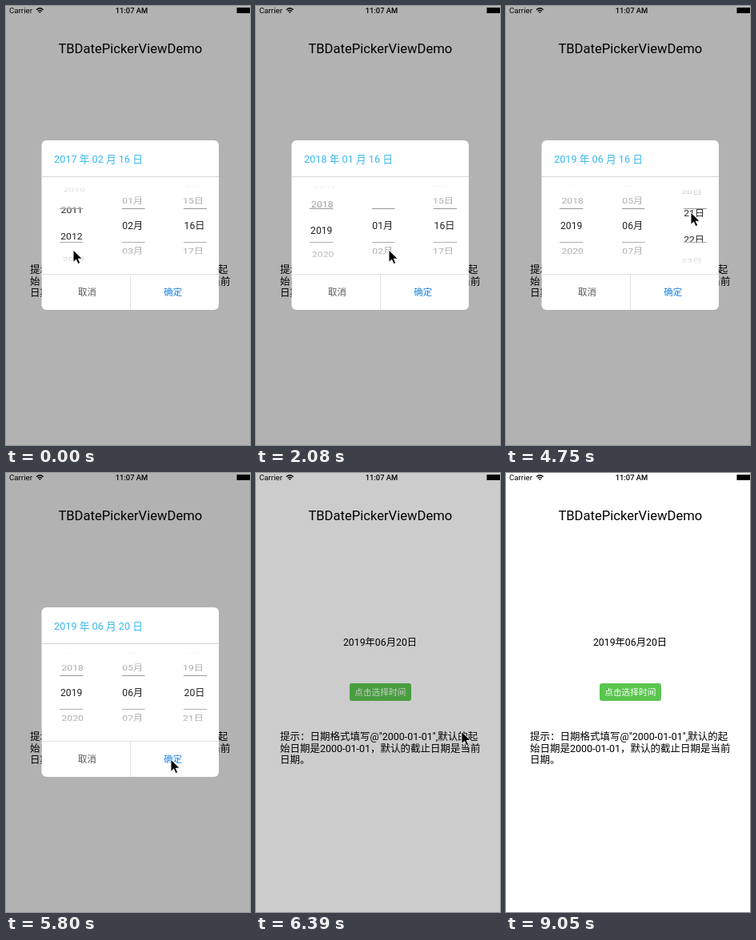
Recreate the animation shown at these times as an HTML page. Size 305 px wide and 549 px high, loop 9.65 s.

```html
<!DOCTYPE html>
<html lang="zh-CN">
<head>
<meta charset="utf-8">
<title>Date picker</title>
<style>
html, body { margin: 0; width: 100%; height: 100%; overflow: hidden; background: #fff; }
svg { display: block; width: 305px; height: 549px; }
text { font-family: Roboto, "Noto Sans CJK SC", "Noto Sans CJK JP", "Noto Sans CJK", sans-serif; font-size: 12.3px; }
.mid { text-anchor: middle; }
.row { text-anchor: middle; fill: #222; font-size: 12.2px; }
.hint { font-size: 12.5px; }
.action { text-anchor: middle; font-size: 11.4px; }
</style>
</head>
<body>
<svg viewBox="0 0 305 549">
  <defs>
    <linearGradient id="fade" x1="0" y1="0" x2="0" y2="1">
      <stop offset="0" stop-color="#fff" stop-opacity=".5"/>
      <stop offset=".45" stop-color="#fff" stop-opacity=".72"/>
      <stop offset=".77" stop-color="#fff"/>
    </linearGradient>
  </defs>
  <rect width="305" height="549" fill="#fff"/>

  <text x="4" y="9.3" style="font-size:9.7px">Carrier</text>
  <path d="M38 4.7Q42.3 .9 46.6 4.7M39.7 6.5Q42.3 4.2 44.9 6.5" fill="none" stroke="#000" stroke-width="1.3"/>
  <path d="M42.3 9L40.9 7.6Q42.3 6.6 43.7 7.6Z"/>
  <text x="157" y="9.3" class="mid" style="font-size:9.4px;font-weight:500">11:07 AM</text>
  <rect x="288.5" y="2" width="17" height="7"/>

  <text x="155.3" y="59" class="mid" style="font-size:16.6px">TBDatePickerViewDemo</text>
  <text x="155" y="215.5" class="mid">2019年06月20日</text>
  <rect x="117" y="263" width="77" height="22" rx="3" fill="#5ac54f"/>
  <text x="155.3" y="278.2" class="mid" fill="#fff" style="font-size:10.7px">点击选择时间</text>
  <text x="30" y="334" class="hint">提示：日期格式填写@"2000-01-01",默认的起</text>
  <text x="30" y="348.5" class="hint">始日期是2000-01-01，默认的截止日期是当前</text>
  <text x="30" y="363" class="hint">日期。</text>

  <rect id="dim" width="305" height="549"/>

  <g id="popup">
    <rect x="44.5" y="168" width="221.5" height="212" rx="6" fill="#fff"/>
    <text id="heading" x="60" y="195.5" fill="#35b8ee" style="font-size:12.7px"></text>
    <g id="wheels"></g>
    <rect id="shade" x="46" y="295.5" width="218" height="39" fill="url(#fade)"/>
    <use href="#shade" transform="matrix(1 0 0 -1 0 549)"/>
    <path d="M67 253.5h29.5M145 253.5h28.5M222 253.5h29" stroke="#999"/>
    <path d="M67 295.5h29.5M145 295.5h28.5M222 295.5h29" stroke="#b0b0b0"/>
    <path d="M44.5 213.5h221.5" stroke="#d4d4d4"/>
    <path d="M44.5 335.5h221.5M155.5 335.5v44.5" stroke="#e2e2e2"/>
    <text x="101.5" y="362.3" class="action" fill="#555">取消</text>
    <text x="208.7" y="362.3" class="action" fill="#1b83e6">确定</text>
  </g>

  <path id="cursor" d="M0 0V15.5L3.6 12.2 6 17.6 8.8 16.4 6.4 11.2H11.3Z" stroke="#fff" stroke-linejoin="round"/>
</svg>
<script>
const LOOP = 9650, STEP = 148.4, LAST = 61;
const CENTER = 275, RADIUS = 53, ROW_ANGLE = 0.637, AXIS = 158;
const $ = id => document.getElementById(id);
const pad = n => String(n).padStart(2, '0');
const progress = (s, start, end) => Math.min(1, Math.max(0, (s - start) / (end - start)));
const smooth = p => p * p * (3 - 2 * p);
const lerp = (a, b, p) => a + (b - a) * p;

// Spins turn a wheel to a new value between two steps.
const wheels = [
  { x: 81.7, unit: '', min: 2000, max: 2099, from: 2011.42, picked: 2017, spins: [
    { start: -1, end: 9, to: 2018 }, { start: 9.5, end: 15.5, to: 2019 }] },
  { x: 158.3, unit: '月', min: 1, max: 12, from: 2, picked: 2, spins: [
    { start: 8, end: 10, to: 1 }, { start: 15, end: 23, to: 6 }] },
  { x: 235.5, unit: '日', min: 1, max: 30, from: 16, picked: 16, spins: [
    { start: 26, end: 30, to: 22 }, { start: 30, end: 36, to: 20 }] }
];

const drag = (x, start, end) => [{ s: start, x, y: 305 }, { s: end, x, y: 250 }];
const cursorPath = [
  ...drag(84, 0, 4),
  ...drag(84, 8, 11),
  ...drag(166, 14, 19),
  { s: 23, x: 206, y: 306 },
  ...drag(233, 26, 31),
  { s: 37, x: 206, y: 358 },
  { s: 39, x: 206, y: 358 },
  { s: 42, x: 273, y: 330 },
  { s: 45, x: 211, y: 304 },
  { s: 48, x: 170, y: 207 },
  { s: 49, x: 170, y: 207 },
  { s: 51, x: 103, y: 210 },
  { s: 54, x: 195, y: 201 },
  { s: 57, x: 241, y: 391 },
  { s: 61, x: 246, y: 560 }
];

function cursorAt(s) {
  const i = Math.max(1, cursorPath.findIndex(k => k.s >= s));
  const a = cursorPath[i - 1], b = cursorPath[i];
  const p = smooth(progress(s, a.s, b.s));
  return [lerp(a.x, b.x, p), lerp(a.y, b.y, p)];
}

const wheelValue = ({ from, spins }, s) =>
  spins.reduce((value, { start, end, to }) => lerp(value, to, smooth(progress(s, start, end))), from);

// A value is picked once its wheel comes to rest.
const pickedValue = ({ picked, spins }, s) =>
  spins.reduce((value, { end, to }, i) =>
    s >= end && !(spins[i + 1]?.start <= end) ? to : value, picked);

for (const wheel of wheels) {
  wheel.rows = Array.from({ length: 5 }, () => {
    const row = document.createElementNS('http://www.w3.org/2000/svg', 'text');
    row.setAttribute('class', 'row');
    row.setAttribute('y', 4.4);
    return $('wheels').appendChild(row);
  });
}

// Rows sit on a cylinder: height follows the sine, squash the cosine.
function drawWheel(wheel, s) {
  const { x, unit, min, max, rows } = wheel;
  const value = wheelValue(wheel, s);
  rows.forEach((row, i) => {
    const n = Math.round(value) + i - 2;
    const angle = (n - value) * ROW_ANGLE, squash = Math.cos(angle);
    const visible = n >= min && n <= max && squash > 0.05;
    row.textContent = visible ? pad(n) + unit : '';
    const left = x + (AXIS - x) * 0.1 * (1 - squash);
    row.setAttribute('transform',
      `translate(${left} ${CENTER + RADIUS * Math.sin(angle)}) scale(1 ${squash})`);
  });
}

function draw(time) {
  const s = Math.min(LAST, Math.floor((time % LOOP + 12) / STEP));
  wheels.forEach(wheel => drawWheel(wheel, s));
  const [year, month, day] = wheels.map(wheel => pad(pickedValue(wheel, s)));
  $('heading').textContent = `${year} 年 ${month} 月 ${day} 日`;
  $('popup').setAttribute('opacity', 1 - progress(s, 39, 42));
  $('dim').setAttribute('opacity', 0.3 * (1 - progress(s, 42, 45)));
  $('cursor').setAttribute('transform', `translate(${cursorAt(s).join(' ')})`);
}

const start = performance.now();
function tick() {
  draw(performance.now() - start);
  requestAnimationFrame(tick);
}
tick();
</script>
</body>
</html>
```
